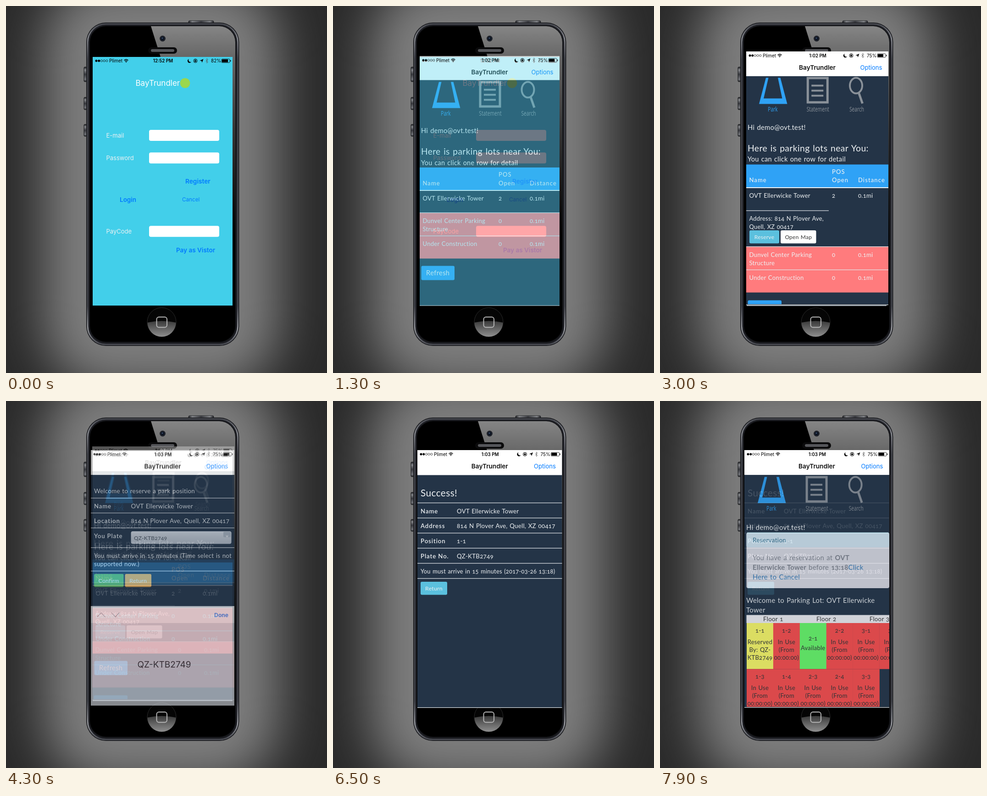
An HTML page that plays this animation: 700x800 px, repeating every 8000 ms.

```html
<!DOCTYPE html>
<html lang="en">
<head>
<meta charset="utf-8">
<title>Parking app walkthrough</title>
<style>
  html, body { margin: 0; width: 100%; height: 100%; overflow: hidden; background: #2a2a2a; }
  svg { display: block; }
  #stage { width: 700px; height: 800px; }
  text { fill: #eef1f3; }
  .r { font-family: Lato, "Open Sans", sans-serif; letter-spacing: .02em; word-spacing: .07em; font-variant-numeric: oldstyle-nums; }
  .h, .t { font-family: Lato, "Open Sans", sans-serif; font-weight: 600; letter-spacing: .065em; }
  .t { font-weight: 500; letter-spacing: .085em; }
  .i { font-family: Inter, "Liberation Sans", sans-serif; }
  .b { font-weight: 600; }
  .c { font-family: "Open Sans", "Noto Sans", sans-serif; }
  .mid { text-anchor: middle; }
  .end { text-anchor: end; }
</style>
</head>
<body>
<svg id="stage" viewBox="0 0 700 800" xmlns="http://www.w3.org/2000/svg"></svg>
<script>
const NAVY = '#243447', BLUE = '#2fa2f6', PINK = '#ff7b7d', IOS = '#007aff', GREY = '#8a9199', DARK = '#333';
const APP = 'BayTrundler', CARRIER = 'Plimet', MAIL = 'demo@ovt.test';
const TOWER = 'OVT Ellerwicke Tower', ADDRESS = ['814 N Plover Ave,', 'Quell, XZ 00417'];
const PLATE = 'QZ-KTB2749';

// Drawing helpers
const text = (x, y, s, size, cls = 'r', fill = '') =>
  `<text x="${x}" y="${y}" font-size="${size}" class="${cls}"${fill && ` style="fill:${fill}"`}>${s}</text>`;
const rect = (x, y, w, h, fill, r = 0, extra = '') =>
  `<rect x="${x}" y="${y}" width="${w}" height="${h}" rx="${r}" fill="${fill}" ${extra}/>`;
const path = (d, stroke, width = 1, fill = 'none') =>
  `<path d="${d}" fill="${fill}" stroke="${stroke}" stroke-width="${width}"/>`;
const circle = (x, y, r, fill, extra = '') => `<circle cx="${x}" cy="${y}" r="${r}" fill="${fill}" ${extra}/>`;
const rule = (x, y, w) => rect(x, y - .5, w, 1.2, '#e4e8ec');
const button = (x, y, w, h, fill, label, size, color) =>
  rect(x, y, w, h, fill, 3) + text(x + w / 2, y + h / 2 + size * .36, label, size, 'r mid', color);
const gradient = (id, stops, attrs) =>
  `<linearGradient id="${id}" ${attrs}>` +
  stops.map(([o, c]) => `<stop offset="${o}" stop-color="${c}"/>`).join('') + '</linearGradient>';
const DOWN = 'x1="0" y1="0" x2="0" y2="1"';

// A screen clips its content to its own box
const screen = (id, x, y, w, h, fill, body) =>
  `<g id="${id}"><svg x="${x}" y="${y}" width="${w}" height="${h}" viewBox="${x} ${y} ${w} ${h}">` +
  rect(x, y, w, h, fill) + body + '</svg></g>';

function statusBar(x, right, y, time, charge, bars = 2) {
  let s = '';
  for (let i = 0; i < 5; i++)
    s += circle(x + 8 + i * 5.7, y, 2.2, i < bars ? '#000' : 'none', 'stroke="#000" stroke-width=".7"');
  s += text(x + 36, y + 3.7, CARRIER, 10, 'i', '#000');
  const wx = x + 73, wy = y + 3;
  s += path(`M${wx - 4.5} ${wy - 4}q4.5-4 9 0M${wx - 2.8} ${wy - 2}q2.8-2.6 5.6 0`, '#000', 1.3) + circle(wx, wy - .4, 1.1, '#000');
  s += text((x + right) / 2 + 1, y + 3.7, time, 9.8, 'i b mid', '#000');
  s += path(`M${right - 95} ${y - 4}a4.3 4.3 0 1 0 5 6a4 4 0 0 1-5-6z`, 'none', 0, '#000');
  s += circle(right - 81, y, 4, 'none', 'stroke="#000"') + rect(right - 83, y - 1, 4, 3, '#000') +
       path(`M${right - 82.2} ${y - 1}v-1q1.2-1.6 2.4 0v1`, '#000', .8);
  s += path(`M${right - 63.5} ${y - 4}l-3 8l-1-3.8l-4-.8z`, 'none', 0, '#000');
  s += path(`M${right - 58.5} ${y - 2.5}l5 5l-2.5 2.5v-10l2.5 2.5l-5 5`, '#555', .8);
  s += text(right - 47, y + 3.7, charge + '%', 10, 'i', '#000');
  s += rect(right - 24, y - 4, 18, 8, 'none', 1.5, 'stroke="#000" stroke-width=".8"') +
       rect(right - 23, y - 3, 16 * charge / 100, 6, '#000', .5) + rect(right - 5, y - 1.5, 1.3, 3, '#000');
  return s;
}

function navBar(x, right, y, bottom, time, bars) {
  const mid = (x + right) / 2;
  return rect(x, y, right - x, bottom - y, '#fff') + statusBar(x, right, y + 9, time, 75, bars) +
    text(mid, y + 40, APP, 13.6, 'i b mid', '#111') + text(right - 13.5, y + 40, 'Options', 13.1, 'i end', IOS);
}

// Three menu icons; y is the top of the row, k widens the spacing
function menu(x, y, k) {
  const label = (cx, s, fill) => `<g transform="translate(${cx} ${y + 73}) scale(.74 1)">${text(0, 0, s, 13.8, 'c mid', fill)}</g>`;
  const sx = x + 105 * k, mx = x + 209 * k;
  return path(`M${x + 15} ${y}l-15 57h61.5l-15-57h-5.5l9.5 45h-40.5l10.5-45z`, 'none', 0, BLUE) +
    rect(sx, y + .5, 43, 53, 'none', 0, `stroke="${GREY}" stroke-width="5"`) +
    [15, 26, 37].map(d => rect(sx + 8, y + d, 26, 4, GREY)).join('') +
    `<ellipse cx="${mx}" cy="${y + 17}" rx="13.5" ry="17" fill="none" stroke="${GREY}" stroke-width="4"/>` +
    path(`M${mx + 6} ${y + 33}l8 23`, GREY, 5) +
    label(x + 30, 'Park', BLUE) + label(sx + 22, 'Statement', GREY) + label(mx + 1.5, 'Search', GREY);
}

const greeting = (x, y, k) =>
  text(x, y, `Hi ${MAIL}!`, 14.6 * k) + text(x, y + 47, 'Here is parking lots near You:', 19.1 * k) +
  text(x, y + 69.3, 'You can click one row for detail', 14.4 * k);

function lotHeader(x, y, w, cols, h) {
  const [a, b, c] = cols;
  return rect(x, y, w, h, BLUE) + text(b, y + 20.3, 'POS', 13, 't') + text(a, y + 38.8, 'Name', 13, 't') +
    text(b, y + 38.8, 'Open', 13, 't') + text(c, y + 38.8, 'Distance', 13, 't') + rect(x, y + h - 1, w, 2, '#eef2f5');
}
const lotRow = (cols, y, name, open) =>
  [name, open, '0.1mi'].map((s, i) => text(cols[i], y, s, 13.1)).join('');
const fullLots = (x, y, w, cols) =>
  rect(x, y, w, 100, PINK) + rule(x, y, w) + lotRow(cols, y + 22, 'Dunvel Center Parking', '0') +
  text(cols[0], y + 40, 'Structure', 13.1) + rule(x, y + 50.5, w) + lotRow(cols, y + 72, 'Under Construction', '0');

function phone() {
  const side = (y, h) => rect(170, y, 6, h, 'url(#key)', 2, 'stroke="#17181b" stroke-width="1"');
  return '<defs>' +
    gradient('edge', [[0, '#4a4c53'], [.045, '#8f9197'], [.11, '#45474e'], [.88, '#45474e'], [.95, '#a2a4a9'], [1, '#4a4c53']], DOWN) +
    gradient('key', [[0, '#1c1d20'], [.2, '#85878b'], [.5, '#37383d'], [.85, '#74767b'], [1, '#1b1c1f']], DOWN) +
    gradient('bar', [[0, '#1d1e22'], [.15, '#85878b'], [.5, '#3c3d42'], [.85, '#85878b'], [1, '#1d1e22']], 'x1="0" y1="0" x2="1" y2="0"') +
    gradient('glare', [[0, '#858585'], [.16, '#646464'], [.5, '#353535'], [1, '#000']], 'gradientUnits="userSpaceOnUse" x1="0" y1="44" x2="0" y2="500"') +
    gradient('home', [[0, '#3a3a3a'], [1, '#8f8f8f']], DOWN) +
    gradient('pick', [[0, '#e9edf3'], [.45, '#d5dae1'], [1, '#c3cad3']], DOWN) +
    '<filter id="glow" filterUnits="userSpaceOnUse" x="-300" y="-300" width="1300" height="1400" color-interpolation-filters="sRGB">' +
    '<feGaussianBlur stdDeviation="54"/></filter>' +
    `<clipPath id="face">${rect(183, 44, 317, 688, '#000', 35)}</clipPath></defs>` +
    rect(0, 0, 700, 800, '#2a2a2a') + rect(82, -57, 514, 891, '#7e7e7e', 138, 'filter="url(#glow)"') +
    rect(398, 32, 55, 7, 'url(#bar)', 2.5, 'stroke="#1b1c20" stroke-width=".8"') +
    side(133, 32) + side(199, 27) + side(258, 26) +
    rect(175, 36, 333.5, 705, '#1b1c20', 43) +
    rect(178, 39, 327.5, 699, '#26272d', 40, 'stroke="url(#edge)" stroke-width="2.4"') +
    rect(181, 42, 321.5, 693, '#16171b', 37) + rect(183, 44, 317, 688, '#000', 35) +
    `<g clip-path="url(#face)">${path('M316 44H500V500H459z', 'none', 0, 'url(#glare)')}</g>` +
    circle(341.5, 71, 6.5, '#22252c') + circle(341.5, 71, 4, '#0c1422') + circle(341, 70, 1.6, '#3c4d6b') +
    rect(310, 90, 63, 14, '#0a0a0b', 7) + rect(316, 94, 51, 6, '#55565a', 3) +
    circle(339.5, 689, 31.5, '#050505', 'stroke="#2b2b2b" stroke-width="1"') +
    path('M308.5 690a31 31 0 0 0 62 0q-31-7-62 0z', 'none', 0, 'url(#home)') +
    rect(328.5, 678, 22.5, 22.5, 'none', 5, 'stroke="#b5b5b5" stroke-width="2"');
}

function loginScreen() {
  const field = (y, label) => text(218.5, y + 16.5, label, 13, 'i') + rect(312, y, 153, 24, '#fff', 4);
  return screen('login', 189, 111, 305, 542, '#42cfea',
    statusBar(189, 494, 119.5, '12:52 PM', 82) + text(282.5, 174, APP, 17, 'i', '#fff') + circle(390.5, 168, 10.8, '#9bd74c') +
    field(270, 'E-mail') + field(319.3, 'Password') + field(479.3, 'PayCode') +
    text(391, 387, 'Register', 13.7, 'i b', IOS) + text(248, 426.5, 'Login', 13.5, 'i b', IOS) +
    text(384, 426, 'Cancel', 11.7, 'i', IOS) + text(371, 537, 'Pay as Vistor', 13.5, 'i b', IOS));
}

function listScreen() {
  const cols = [195.5, 361, 429];
  return screen('list', 189, 109, 305, 545, NAVY,
    navBar(189, 494, 109, 161.5, '1:02 PM') + menu(216, 165.5, 1) + greeting(192, 277.3, 1) +
    lotHeader(189, 352, 305, cols, 50) + lotRow(cols, 423.5, TOWER, '2') + fullLots(189, 450.5, 305, cols) +
    button(192.5, 566.5, 72.5, 31, BLUE, 'Refresh', 14.8) + rule(189, 653, 305));
}

function detailScreen() {
  const cols = [194.5, 375, 432];
  return screen('detail', 188, 99, 310, 553, NAVY,
    navBar(188, 498, 99, 153, '1:02 PM') + menu(216, 156.5, 1.012) + greeting(191, 270, 1.012) +
    lotHeader(188, 345.5, 310, cols, 50.5) + lotRow(cols, 417.5, TOWER, '2') + rule(188, 446, 180) +
    text(194.5, 467.5, `Address: ${ADDRESS[0]}`, 12.9) + text(194.5, 485.5, ADDRESS[1], 12.9) +
    button(195, 489, 65, 28.5, '#5bc0de', 'Reserve', 12) + button(263, 489, 77.5, 28.5, '#fff', 'Open Map', 12, DARK) +
    fullLots(188, 524.5, 310, cols) + rect(191.5, 641.5, 73.5, 30, BLUE, 3) +
    rect(188, 650, 310, 2, '#0d1218') + rule(188, 651.2, 310));
}

function reserveScreen() {
  const pair = (y, a, b) => text(192, y, a, 13.2, 'h') + (b ? text(272.5, y, b, 13.3) : '');
  return screen('reserve', 185, 107, 313, 557, NAVY,
    navBar(185, 498, 107, 161, '1:03 PM', 3) + text(192, 201, 'Welcome to reserve a park position', 13.3) +
    [211.5, 244, 276.5, 319.5, 370.5].map(y => rule(185, y, 313)).join('') +
    pair(233.5, 'Name', TOWER) + pair(266, 'Location', ADDRESS.join(' ')) + pair(298.5, 'You Plate') +
    rect(272.5, 284, 219, 27.5, 'url(#pick)', 4) + rect(474, 285, 16, 12, '#b9c1cb', 2) +
    path('M479 293.5h6l-3 4z', 'none', 0, '#f4f6f8') + text(279, 302.5, PLATE, 12, 'r', '#4a525c') +
    text(192, 341.5, 'You must arrive in 15 minutes (Time select is not', 13.2) + text(192, 359.5, 'supported now.)', 13.2) +
    button(192, 377, 64.5, 28.5, '#5cb85c', 'Confirm', 12.3) + button(259.5, 377, 57.5, 28.5, '#f0ad4e', 'Return', 12.3) +
    rect(185, 447, 313, 37, '#ecedf0') + rect(185, 484, 313, 180, '#cbd0d7') +
    path('M199 470.5l8.5-9l8.5 9M230 461.5l8.5 9l8.5-9', '#969ca5', 1.3) +
    text(485, 470.5, 'Done', 12.2, 'i b end', '#0a6fe8') + text(345, 581, PLATE, 19, 'i mid', '#1c1e22'));
}

function successScreen() {
  const rows = [['Name', TOWER], ['Address', ADDRESS.join(' ')], ['Position', '1-1'], ['Plate No.', PLATE]];
  return screen('success', 184, 107, 315.5, 562, NAVY,
    navBar(184, 499.5, 107, 161.5, '1:03 PM') + text(191, 207.5, 'Success!', 20.8) +
    rows.map(([a, b], i) => rule(184, 222 + i * 32.9, 316) + text(191, 244.5 + i * 32.9, a, 13.3, 'h') +
      text(270, 244.5 + i * 32.9, b, 13.3)).join('') +
    rule(184, 353.7, 316) + text(191, 375.5, 'You must arrive in 15 minutes (2017-03-26 13:18)', 12.8) +
    rule(184, 386.7, 316) + button(191, 394, 58, 28.5, '#5bc0de', 'Return', 12.3) + rule(184, 668.3, 316));
}

function floorScreen() {
  const W = 57.9, X = 189;
  const busy = ['In Use', '(From', '00:00:00)'];
  const cell = (col, y, id, lines, fill) => {
    const mid = X + W * (col + .5), gap = lines.length === 1 ? 17 : 0;
    return rect(X + W * col, y, W + .3, 100.3, fill) + text(mid, y + 21 + gap, id, 13, 'r mid', DARK) +
      lines.map((s, i) => text(mid, y + 46 + gap * .75 + i * 17, s, 13, 'r mid', DARK)).join('');
  };
  let cells = '';
  for (let row = 0; row < 2; row++)
    for (let col = 0; col < 6 - row; col++) {
      const id = `${(col >> 1) + 1}-${row * 2 + col % 2 + 1}`;
      const [lines, fill] = id === '1-1' ? [['Reserved', 'By: QZ-', 'KTB2749'], '#ffff68'] :
        id === '2-1' ? [['Available'], '#6aff6a'] : [busy, '#ff4e4c'];
      cells += cell(col, 484 + row * 100.3, id, lines, fill);
    }
  const [first, ...rest] = TOWER.split(' ');
  const bold = s => `<tspan font-weight="700">${s}</tspan>`, link = s => `<tspan fill="#337ab7" style="fill:#337ab7">${s}</tspan>`;
  return screen('floors', 184, 107, 316, 562, NAVY,
    navBar(184, 500, 107, 161, '1:03 PM') + menu(213, 165.5, 1.02) + text(188, 280.5, `Hi ${MAIL}!`, 15) +
    rect(188.5, 287, 311.5, 121, '#dddde6', 4) + rect(188.5, 287, 311.5, 32, '#d4e8f4', 4) +
    rect(190, 286.5, 308, 1.5, '#c4f0fa') + text(202, 307.5, 'Reservation', 13.6, 'r', '#31708f') +
    text(202, 346.5, `You have a reservation at ${bold(first)}`, 14.8, 'r', '#7f848e') +
    text(202, 367.5, `${bold(rest.join(' '))} before ${bold('13:18')}${link('Click')}`, 14.8, 'r', '#7f848e') +
    text(202, 388.5, 'Here to Cancel', 14.8, 'r', '#337ab7') +
    text(188, 440, `Welcome to Parking Lot: ${first} ${rest[0]}`, 14.9) + text(188, 460.5, rest[1], 14.9) +
    rect(188.5, 466.5, 312, 17.5, '#f3f3f6') +
    [1, 2, 3].map(n => text(X + W * (2 * n - 1), 480, `Floor ${n}`, 13.3, 'r mid', DARK)).join('') +
    cells + rect(184, 666.5, 316, 3, '#10161e') + rule(184, 667.8, 316));
}

document.getElementById('stage').innerHTML = phone() + loginScreen() + listScreen() + detailScreen() +
  reserveScreen() + successScreen() + floorScreen();

const LOOP = 8000, TICK = 100, STEPS = 6;
const [list, detail, reserve, success, floors] =
  ['list', 'detail', 'reserve', 'success', 'floors'].map(id => document.getElementById(id));

// Stepped opacity: the first step shows at the start time, the last one 500 ms later
const fade = (t, start) => Math.min(1, Math.max(0, (Math.floor((t - start) / TICK) + 1) / STEPS));
const show = (node, opacity) => {
  node.style.opacity = opacity;
  node.style.display = opacity ? '' : 'none';
};

function draw(t) {
  show(list, fade(t, 1000));
  show(detail, fade(t, 2500) * (1 - fade(t, 4000)));
  show(reserve, fade(t, 4000));
  show(success, fade(t, 6000));
  show(floors, fade(t, 7500));
}

let begin;
function frame(now) {
  begin ??= now;
  draw(Math.max(0, now - begin) % LOOP);
  requestAnimationFrame(frame);
}
draw(0);
requestAnimationFrame(frame);
</script>
</body>
</html>
```
